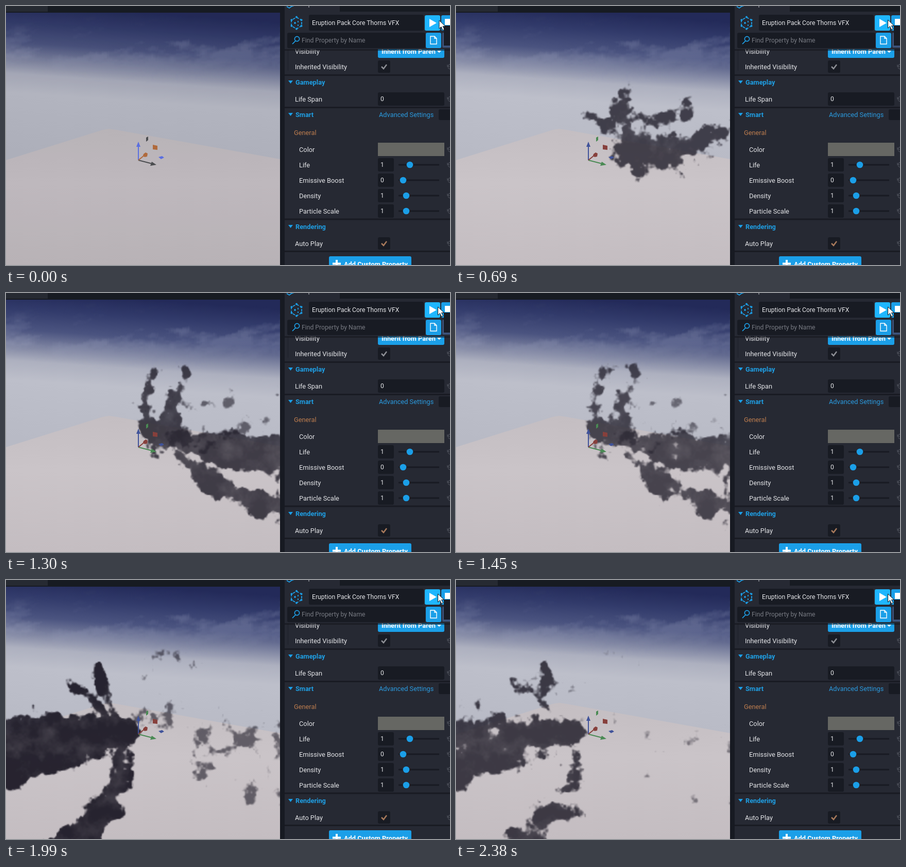
An HTML page with a canvas that plays this animation: 862x504 px, repeating every 2450 ms.

```html
<!DOCTYPE html>
<html lang="en">
<head>
<meta charset="utf-8">
<title>Smoke burst preview</title>
<style>
  html, body { margin: 0; width: 862px; height: 504px; overflow: hidden; background: #171b22; }
  canvas, svg { position: absolute; left: 0; top: 0; }
  text { font: 12.8px Roboto, sans-serif; fill: #e4e5e8; }
  .head { font-weight: 700; fill: #1f9fe4; }
  .bold { font-weight: 700; fill: #fff; }
  .small { font-size: 12.2px; }
  .field { fill: #181b23; }
  .blue { fill: #1b9fe8; }
  .line { fill: none; stroke: #1fa4ee; stroke-width: 1.7; }
  .z { fill: #40539a; stroke: #40539a; }
  .y { fill: #4a8a54; stroke: #4a8a54; }
  .x { fill: #87403c; stroke: #87403c; }
  .idle .z { fill: #5b6fe0; stroke: #5b6fe0; }
  .idle .y { fill: #4b4d50; stroke: #4b4d50; }
  .idle .x { fill: #b06a3c; stroke: #b06a3c; }
</style>
</head>
<body>
<canvas width="862" height="504"></canvas>
<svg width="862" height="504" viewBox="0 0 862 504">
  <rect width="532" height="13" fill="#171b22"/>
  <rect width="81" height="11" fill="#262a32"/>
  <g id="gizmo" stroke-width="2">
    <g class="z"><path d="M257 300V272"/><path d="M257 264l4 10h-8zM296 294l7-2 4 3-6 3z" stroke="none"/></g>
    <g class="y"><path d="M257 300l27 7"/><path d="M292 309l-12 2 3-8zM272 256l4-2v7l-4 3z" stroke="none"/></g>
    <g class="x"><path d="M257 300l11-9"/><path d="M267 288l4-3 4 2-1 6-5 1-3-3zM285 270l9 2v8l-9-1z" stroke="none"/></g>
  </g>

  <rect x="532" width="330" height="504" fill="#171a22"/>
  <rect x="541" y="84" width="321" height="420" fill="#262933"/>
  <path d="M547.5 84V126" stroke="#1d2029"/>
  <path d="M541 134.500H862M541 197.500H862M541 415H862M541 477.500H862" stroke="#191b23" stroke-width="3"/>
  <g id="rows"></g>
  <text x="561" y="93">Visibility</text>
  <rect class="blue" x="722" y="76" width="129" height="25" rx="3"/>
  <text class="bold" x="729" y="93">Inherit from Paren</text>
  <path d="M837 87h8l-4 4z" fill="#fff"/>
  <text x="561" y="123">Inherited Visibility</text>
  <text x="561" y="186">Life Span</text>
  <rect class="field" x="722" y="168" width="129" height="26" rx="3"/>
  <text class="small" x="727" y="185">0</text>
  <text x="724" y="216" style="fill:#2b9ade">Advanced Settings</text>
  <rect class="field" x="840" y="201" width="30" height="21" rx="3"/>
  <text x="559" y="251" style="fill:#bd7d4f">General</text>
  <text x="569" y="284">Color</text>
  <rect x="722" y="266" width="129" height="26" fill="#666763"/>
  <text x="561" y="467">Auto Play</text>
  <rect class="blue" x="627" y="487" width="160" height="25" rx="3"/>
  <path d="M634 501.500h16M642 494v16" stroke="#fff" stroke-width="4"/>
  <text class="bold" x="656" y="507">Add Custom Property</text>

  <rect x="541" y="84" width="321" height="3" fill="#13151b" opacity=".55"/>
  <rect x="541" width="321" height="84" fill="#262933"/>
  <rect x="648" width="214" height="11" fill="#171b22"/>
  <path d="M545 1l5 3 4-3 6-2" class="line"/>
  <path d="M588 0v3" stroke="#c8cad0"/>
  <path class="line" stroke-dasharray="5 2.500" d="M564 22l10 5.500v11l-10 6-10-6v-11z"/>
  <path class="line" d="M561 31v4M559 33h4M567 29v3M567 36v3"/>
  <g id="nodes" class="blue"></g>
  <rect class="field" x="588" y="17" width="223" height="31" rx="3"/>
  <text class="small" x="594" y="37">Eruption Pack Core Thorns VFX</text>
  <rect id="play" x="813" y="18" width="30" height="30" rx="3"/>
  <path d="M822 25l14 8-14 8z" fill="#fff"/>
  <rect class="blue" x="845" y="18" width="25" height="30" rx="3"/>
  <rect x="852" y="25" width="12" height="12" fill="#fff"/>
  <rect class="field" x="546" y="52" width="268" height="30" rx="3"/>
  <circle class="line" cx="565" cy="64" r="4.600"/>
  <path class="line" d="M562 68l-6 6"/>
  <text class="small" x="574" y="71" style="fill:#777a82">Find Property by Name</text>
  <rect class="blue" x="815" y="52" width="30" height="30" rx="3"/>
  <path d="M824 59h8l4 4v11h-12zM832 59v4h4" fill="none" stroke="#fff" stroke-width="1.400"/>
  <rect x="847" y="52" width="20" height="29" rx="2" fill="#3c5279"/>
  <rect x="850" y="38" width="12" height="39" fill="#191c25"/>
  <circle id="click" cx="838" cy="28" r="11.500" fill="#a9c648" opacity=".75"/>
  <path id="cursor" d="M0 0V16l4-3.500 3 6.500 3-1.500-3-6h5z" fill="#fff" stroke="#15171c"/>
</svg>
<script>
const LOOP = 2450, STEPS = 32;
const W = 266, H = 246, TOP = 13, TILE = 512;
const $ = s => document.querySelector(s);
const ctx = $('canvas').getContext('2d');
const clamp = (v, lo = 0, hi = 1) => Math.min(hi, Math.max(lo, v));
const smooth = v => (v = clamp(v)) * v * (3 - 2 * v);
const range = n => [...Array(n).keys()];

// Panel parts that repeat
const check = (y, color) => `<rect class="field" x="722" y="${y - 12}" width="24" height="24" rx="3"/>
  <path d="M729 ${y}l4 4 6-8" fill="none" stroke="${color}" stroke-width="2.500"/>`;
const heading = (label, y) => `<path class="blue" d="M548 ${y - 3}h9l-4.500 6z"/>
  <text class="head" x="562" y="${y + 5}">${label}</text>`;
const slider = ([label, value, knob], i) => {
  const y = 309 + 30 * i;
  return `<text x="569" y="${y + 5}">${label}</text>
    <rect class="field" x="722" y="${y - 13}" width="31" height="26" rx="3"/>
    <text class="small" x="727" y="${y + 4}">${value}</text>
    <rect class="field" x="762" y="${y - 1.5}" width="79" height="3" rx="1"/>
    <circle class="blue" cx="${knob}" cy="${y}" r="6.300"/>`;
};
const reset = y => `<path d="M857 ${y - 4}v4h4M858 ${y - 1}q2-4 6-4M858 ${y + 2}q2 3 6 3"
  fill="none" stroke="#4b4e58" stroke-width="1.300"/>`;
$('#rows').innerHTML = check(118, '#8d8f95') + check(462, '#a97a5c') +
  heading('Gameplay', 148) + heading('Smart', 211) + heading('Rendering', 429) +
  [['Life', 1, 784], ['Emissive Boost', 0, 771], ['Density', 1, 777], ['Particle Scale', 1, 777]].map(slider).join('') +
  [118, 181, 279, 309, 339, 369, 399, 462].map(reset).join('');
$('#nodes').innerHTML = range(6).map(i => `<circle r="2" cx="${564 + 11 * Math.sin(i * Math.PI / 3)}"
  cy="${33 - 11.5 * Math.cos(i * Math.PI / 3)}"/>`).join('');

// Tiling fractal noise, roughly -1 to 1
const noise = new Float32Array(TILE * TILE);
let seed = 7;
const random = () => (seed = seed * 16807 % 2147483647) / 2147483647;
for (let cell = 16, gain = .9; cell > 1; cell /= 2, gain *= .6) {
  const n = TILE / cell, grid = Array.from({ length: n * n }, () => random() * 2 - 1);
  for (let y = 0; y < TILE; y++) for (let x = 0; x < TILE; x++) {
    const i = x / cell | 0, j = y / cell | 0, i2 = (i + 1) % n, j2 = (j + 1) % n;
    const u = smooth(x / cell - i), v = smooth(y / cell - j);
    const a = grid[j * n + i] * (1 - u) + grid[j * n + i2] * u;
    const b = grid[j2 * n + i] * (1 - u) + grid[j2 * n + i2] * u;
    noise[y * TILE + x] += gain * (a * (1 - v) + b * v);
  }
}
const noiseAt = (x, y) => noise[(y & 511) * TILE + (x & 511)];

// Half-size layer of one colour with alpha given by a function of the position
const small = new OffscreenCanvas(W, H), smallCtx = small.getContext('2d');
function drawLayer(target, [r, g, b], alphaAt) {
  const image = smallCtx.createImageData(W, H), d = image.data;
  for (let i = 0; i < W * H; i++) {
    d[i * 4] = r; d[i * 4 + 1] = g; d[i * 4 + 2] = b;
    d[i * 4 + 3] = 255 * alphaAt(i % W * 2, (i / W | 0) * 2 + TOP, i);
  }
  smallCtx.putImageData(image, 0, 0);
  target.drawImage(small, 0, TOP, W * 2, H * 2);
}

const scene = new OffscreenCanvas(532, 504);
function paintScene(c) {
  const fill = (coords, stops) => {
    const g = c.createLinearGradient(...coords);
    stops.forEach(([at, color]) => g.addColorStop(at, color));
    c.fillStyle = g;
  };
  fill([266, 13, 246, 300], [[0, '#232a59'], [.12, '#323b6b'], [.26, '#4b5480'], [.37, '#7e84a1'],
    [.47, '#adb0bf'], [.6, '#bdbfca'], [1, '#b8bac5']]);
  c.fillRect(0, 0, 532, 504);
  drawLayer(c, [178, 184, 208], (x, y) =>
    clamp(noiseAt(x / 5 + 60, y / 2 + x / 12) * .3 + .02, 0, .25) * Math.exp(-(((y - 80) / 36) ** 2)));
  fill([0, 239, 0, 504], [[0, '#c4bec2'], [.4, '#cac4c8'], [1, '#c4bdc1']]);
  c.beginPath();
  [[0, 300], [188, 241], [200, 239], [214, 241], [532, 298], [532, 504], [0, 504]].forEach(p => c.lineTo(...p));
  c.fill();
}
paintScene(scene.getContext('2d'));

// Smoke spikes leave one root: angle in degrees, length, radius at root and tip, sideways bend
const bursts = [
  { start: 2, x: 350, y: 270, alpha: .9, spikes: [
    [255, 98, 38, 9, 12], [213, 95, 30, 8, 0], [351, 164, 42, 10, -16],
    [18, 95, 36, 18, 0], [85, 52, 30, 9, 0], [318, 118, 4, 10, 0]] },
  { start: 14, x: 310, y: 288, alpha: .82, spikes: [
    [260, 132, 18, 5, 30], [287, 132, 30, 6, 8], [7, 252, 26, 44, 0], [28, 284, 18, 27, -26]] },
  { start: 23, x: 222, y: 295, alpha: .97, spikes: [
    [171, 250, 38, 74, 0], [116, 252, 18, 38, 40], [226, 122, 26, 3, 0], [250, 130, 24, 2, 0]] }
];

// Spine of one spike as tapered segments along a quadratic curve
function segments({ x, y }, [angle, length, root, tip, bend], pieces = 6) {
  const c = Math.cos(angle * Math.PI / 180), s = Math.sin(angle * Math.PI / 180);
  const at = t => {
    const side = 4 * t * (1 - t) * bend;
    return { x: x + c * length * t + s * side, y: y + s * length * t - c * side, r: root + (tip - root) * t };
  };
  return range(pieces).map(i => [at(i / pieces), at((i + 1) / pieces)]);
}

// Distance inside a tapered segment, negative outside
function depth(x, y, a, b) {
  const dx = b.x - a.x, dy = b.y - a.y;
  const u = clamp(((x - a.x) * dx + (y - a.y) * dy) / (dx * dx + dy * dy));
  const ex = x - a.x - dx * u, ey = y - a.y - dy * u;
  return a.r + (b.r - a.r) * u - Math.sqrt(ex * ex + ey * ey);
}

for (const burst of bursts) {
  const parts = burst.spikes.flatMap(s => segments(burst, s));
  burst.field = new Float32Array(W * H).map((_, i) => {
    let best = -99;
    for (const [a, b] of parts) best = Math.max(best, depth(i % W * 2, (i / W | 0) * 2 + TOP, a, b));
    return best;
  });
}

// Spikes shoot out, then puff up while noise eats them away
function drawBurst(burst, step) {
  const age = step - burst.start;
  if (age < 1 || age > 18) return;
  const reach = 120 * age;
  const decay = Math.max(0, (age - 3) / 9);
  const rough = 15 + 31 * decay, soft = 7 + 17 * decay;
  const swell = 2 + 10 * decay - 28 * decay * decay;
  const opacity = burst.alpha * (1 - .25 * decay);
  const shift = burst.start * 37 + age;
  drawLayer(ctx, [33, 30, 42], (x, y, i) => {
    if (burst.field[i] < -60) return 0;
    const inside = Math.min(burst.field[i], 40, reach - Math.hypot(x - burst.x, y - burst.y));
    const n = noiseAt(x / 2 + shift, y / 2 + burst.start * 11);
    return smooth((inside + swell + rough * n) / soft) * opacity * clamp(.96 + .1 * n);
  });
}

function draw(step) {
  ctx.drawImage(scene, 0, 0);
  if (step === 0) {
    ctx.fillStyle = 'rgba(40,38,45,.07)';
    ctx.fillRect(0, TOP, 532, 491);
  }
  bursts.forEach(b => drawBurst(b, step));
  const clicked = bursts.some(b => step === b.start - 1);
  $('#gizmo').setAttribute('class', step ? '' : 'idle');
  $('#click').style.display = clicked ? '' : 'none';
  $('#play').setAttribute('fill', clicked ? '#1b9fe8' : '#1fb6ff');
  $('#cursor').setAttribute('transform', step ? 'translate(838.5 27)' : 'translate(841 28)');
}

let shown = -1;
function tick() {
  const step = Math.floor((performance.now() % LOOP + 8) / LOOP * STEPS) % STEPS;
  if (step !== shown) draw(shown = step);
  requestAnimationFrame(tick);
}
tick();
</script>
</body>
</html>
```
